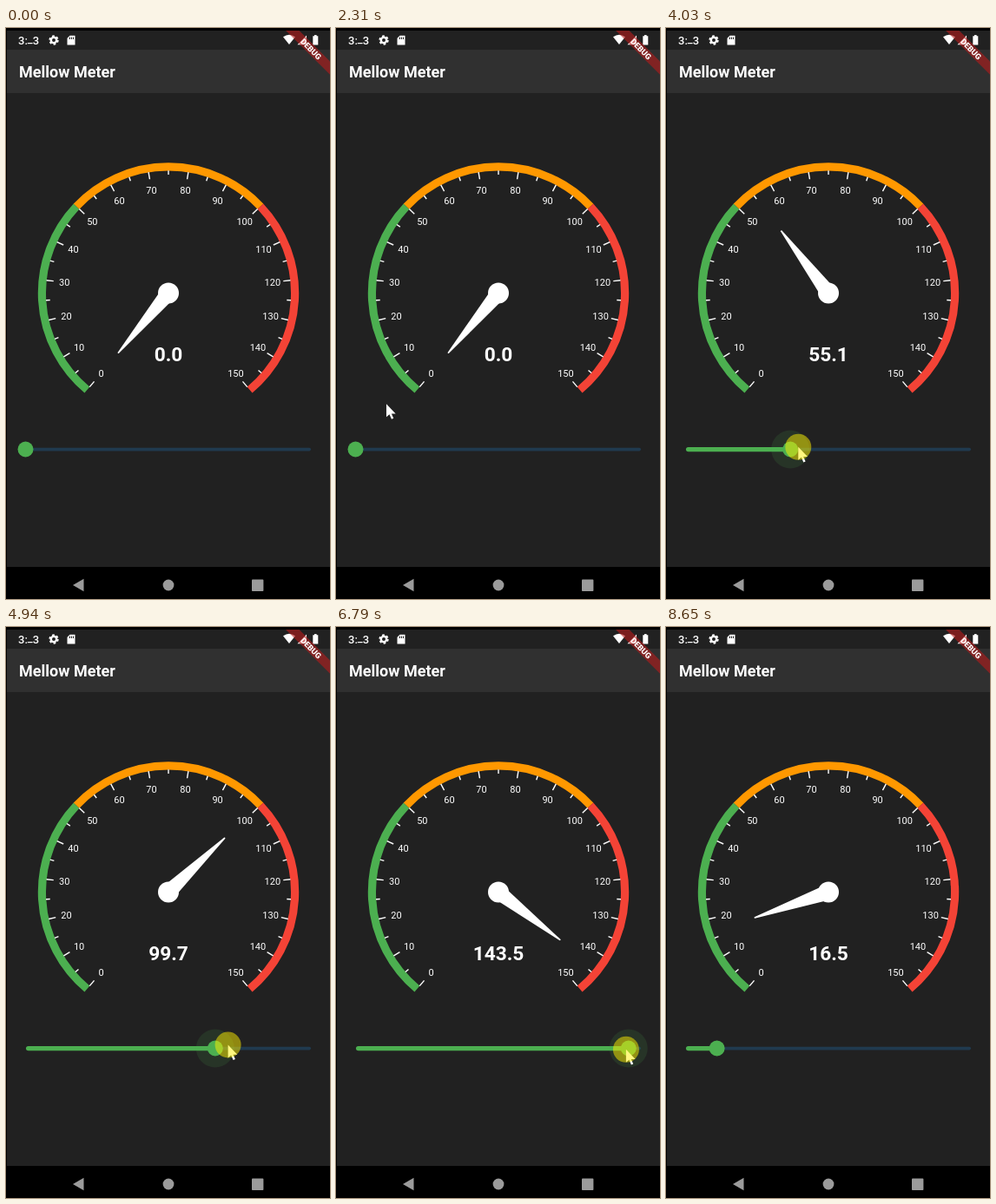
An HTML page for the animation above (9.12 s loop, 373 px wide and 658 px high).

```html
<!DOCTYPE html>
<html lang="en">
<head>
<meta charset="utf-8">
<title>Mellow Meter</title>
<style>
html, body { margin: 0; width: 100%; height: 100%; overflow: hidden; background: #000; }
svg { display: block; width: 373px; height: 658px; font-family: Roboto, sans-serif; }
text { fill: #fff; }
.mid { text-anchor: middle; }
</style>
</head>
<body>
<svg viewBox="0 0 373 658">
  <rect x="1" y="3" width="372" height="618" fill="#212121"/>
  <rect x="1" y="25" width="372" height="50" fill="#303030"/>
  <text x="15" y="57" font-size="18" font-weight="700">Mellow Meter</text>

  <g fill="#fff">
    <text x="14" y="18.6" font-size="13" font-weight="500">3:<tspan dy="-2">_</tspan><tspan dy="2">3</tspan></text>
    <g fill="none" stroke="#fff">
      <circle cx="55" cy="14" r="3.2" stroke-width="2.4"/>
      <circle cx="55" cy="14" r="4.8" stroke-width="1.8" stroke-dasharray="2.6 2.43"/>
    </g>
    <path d="M73.5 8.7h6v10.8h-9v-7.8z"/>
    <path d="M73.5 10.5v2.5m2-2.5v2.5m2-2.5v2.5" stroke="#212121"/>
    <path d="M326 19l-7-8.7q7-5 14 0z"/>
    <path d="M335.5 19.2h10.5v-10.7z"/>
    <path d="M353.3 9.2h1.7v-1.2h2.6v1.2h1.7v10.3h-6z"/>
  </g>

  <svg y="3" width="373" height="72" viewBox="0 3 373 72">
    <g transform="translate(373 2.5) rotate(45)">
      <rect x="-36.3" y="25.4" width="72.6" height="10.9" fill="#b71c1c" fill-opacity=".6"/>
      <text class="mid" y="34.2" font-size="9.2" font-weight="900">DEBUG</text>
    </g>
  </svg>

  <g id="dial"></g>
  <path id="needle" d="M0-9L90-.8Q91 0 90 .8L0 9z" fill="#fff"/>
  <circle cx="187" cy="305.5" r="12" fill="#fff"/>
  <text id="readout" class="mid" x="187" y="384" font-size="22.7" font-weight="700"></text>

  <rect x="23" y="483.8" width="328" height="3.6" rx="1.8" fill="#203a4f"/>
  <rect id="filled" x="23" y="482.9" height="5.4" rx="2.7" fill="#4caf50"/>
  <g id="thumb" fill="#4caf50">
    <circle id="halo" cy="485.5" r="22" fill-opacity=".13"/>
    <circle cy="485.5" r="9"/>
  </g>

  <g fill="#9b9b9b">
    <path d="M77 642l12.5-7.2v14.4z"/>
    <circle cx="187" cy="642" r="6.4"/>
    <rect x="283" y="635.6" width="13.4" height="13.4" rx=".8"/>
  </g>

  <g id="cursor">
    <path d="M0 0v15l3.5-3.1 2.5 5.7 2.3-1-2.4-5.4h4.8z" fill="#fff"/>
    <circle id="press" r="15" fill="#fff000" fill-opacity=".5"/>
  </g>
</svg>
<script>
const LOOP = 9120, STEP = 69, PHASE = 3130;
const CX = 187, CY = 305.5;
const $ = id => document.getElementById(id);
const angle = value => 130 + value * 280 / 150;
const clamp = v => Math.max(0, Math.min(1, v));
const ramp = (t, from, to) => clamp((t - from) / (to - from));
const mix = (a, b, p) => a.map((v, i) => v + (b[i] - v) * p);

function polar(value, radius) {
  const a = angle(value) * Math.PI / 180;
  return [CX + radius * Math.cos(a), CY + radius * Math.sin(a)];
}

function buildDial() {
  let out = '';
  ['#4caf50', '#ff9800', '#f44336'].forEach((color, i) => {
    out += `<path d="M${polar(i * 50, 145.6)}A145.6 145.6 0 0 1 ${polar(i * 50 + 50, 145.6)}"
      fill="none" stroke="${color}" stroke-width="9.2"/>`;
  });
  for (let v = 0; v <= 150; v += 5) {
    const major = v % 10 === 0;
    out += `<path d="M${polar(v, 141.2)}L${polar(v, major ? 133 : 136.5)}" stroke="#fff" stroke-width="1.4"/>`;
    if (major) {
      const [x, y] = polar(v, 120.5);
      out += `<text class="mid" x="${x}" y="${y + 4}" font-size="11">${v}</text>`;
    }
  }
  $('dial').innerHTML = out;
}

// A click on the needle, then a drag up the slider and one back down.
const click = [1330, 1890];
const drags = [[2530, 5960], [6500, 7960]];
const rise = t => ramp(t, 3130, 5936);
const fall = t => ramp(t, 6730, 7900);
const isDown = t => [click, ...drags].some(([down, up]) => t >= down && t < up);
const haloSize = t => Math.max(...drags.map(
  ([down, up]) => Math.min(ramp(t, down, down + 100), 1 - ramp(t, up, up + 60))));

const valueAt = t => 10.5 * ramp(t, 2600, 2900) + 139.5 * rise(t) - 133.5 * fall(t);
const thumbX = value => 22.5 + value / 150 * 328.5;

// On the slider the pointer runs a little ahead of the thumb.
function sliderPointer(t) {
  const up = rise(t), down = fall(t);
  const lead = 17 * (1 - (1 - up) ** 2 - ramp(t, 6200, 6500)) - 22.4 * Math.sin(down * Math.PI * 5 / 6);
  return [thumbX(valueAt(t)) + lead, 489 - 7.8 * Math.sin(up * Math.PI * .92) - 5 * down];
}

function pointer(t) {
  let at = [334, 645];
  at = mix(at, [139, 357], ramp(t, 260, 1020));
  at = mix(at, [130, 320], ramp(t, 1336, 1690));
  at = mix(at, sliderPointer(t), ramp(t, 1900, 2500));
  return mix(at, [341, 655], ramp(t, 8300, 8620));
}

function draw(time) {
  // The screen refreshes in fixed steps.
  const t = PHASE + Math.floor((time - PHASE) / STEP) * STEP;
  const value = valueAt(t), x = thumbX(value);

  $('needle').setAttribute('transform', `translate(${CX} ${CY}) rotate(${angle(value)})`);
  $('readout').textContent = value.toFixed(1);
  $('filled').setAttribute('width', x - 22.5);
  $('thumb').setAttribute('transform', `translate(${x})`);
  $('halo').setAttribute('r', 22 * haloSize(t));
  $('cursor').setAttribute('transform', `translate(${pointer(t)})`);
  $('cursor').style.display = time >= 260 && time < 8640 ? '' : 'none';
  $('press').style.display = isDown(t) ? '' : 'none';
}

buildDial();
const start = performance.now();
function tick() {
  draw((performance.now() - start) % LOOP);
  requestAnimationFrame(tick);
}
tick();
</script>
</body>
</html>
```
